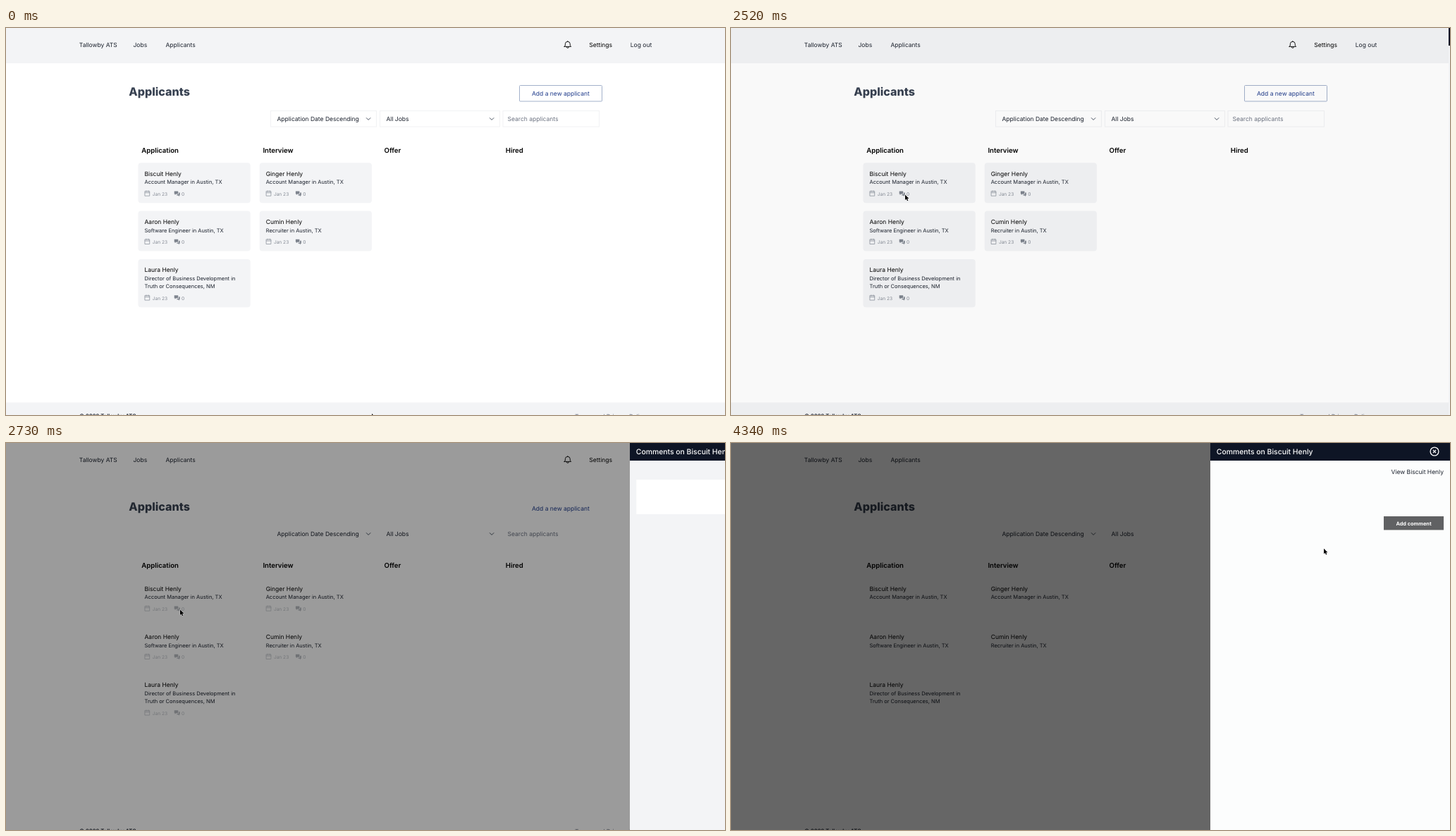
An HTML page that plays this animation: 1020 by 549 pixels, repeating every 4410 ms.

```html
<!DOCTYPE html>
<html lang="en">
<head>
<meta charset="utf-8">
<title>Applicants board</title>
<style>
  html, body { margin: 0; width: 100%; height: 100%; overflow: hidden; background: #fff; }
  svg { display: block; width: 1020px; height: 549px; }
  text { font-family: Inter, sans-serif; font-size: 8.5px; fill: #1a202c; text-rendering: geometricPrecision; }
  .surface { fill: #f3f4f6; }
  .field { fill: none; stroke: #f1f2f4; }
  .button { fill: #fff; stroke: #a3b1cb; }
  .line { fill: none; stroke: #374151; stroke-width: .9; stroke-linecap: round; stroke-linejoin: round; }
  .strong { fill: #000; }
  .action { fill: #1e3a8a; }
  .muted { fill: #6b7280; }
  .title { font-size: 16.1px; font-weight: 800; fill: #374151; }
  .column { font-size: 9.6px; font-weight: 600; fill: #000; }
  .role { font-size: 7.5px; }
  .copyright { font-size: 7.7px; font-weight: 600; }
  .meta text { font-size: 6.6px; fill: #858b95; }
  .meta .line { stroke: #858b95; stroke-width: .7; }
  .chat { fill: #7e848e; }
  .heading { font-size: 10.4px; font-weight: 500; fill: #fff; }
  .submit { font-size: 7.35px; font-weight: 700; fill: #fff; text-anchor: middle; }
  .end { text-anchor: end; }
  .flat .surface, .flat .field, .flat .button { visibility: hidden; }
  .flat .meta { opacity: .55; }
  .settled .meta, .settled #note { visibility: hidden; }
  #sheet { fill: #f3f4f6; }
  .settled #sheet { fill: #fcfdfd; }
  #arrow { stroke: #fff; stroke-width: .6; paint-order: stroke; }
</style>
</head>
<body>
<svg id="stage" viewBox="0 0 1020 549"></svg>
<script>
const LOOP = 4410, STEP = 70;
const stage = document.getElementById('stage');

const text = (x, y, str, cls = '') => `<text x="${x}" y="${y}" class="${cls}">${str}</text>`;
const rect = (x, y, w, h, cls, extra = '') =>
  `<rect x="${x}" y="${y}" width="${w}" height="${h}" class="${cls}" ${extra}/>`;

const field = (x, w, label, isSelect) =>
  rect(x, 117.5, w, 22.5, 'field') +
  text(x + (isSelect ? 9 : 6.6), 132, label, isSelect ? '' : 'muted') +
  (isSelect ? `<path class="line" d="M${x + w - 14.2} 127.6l2.8 2.8 2.8-2.8"/>` : '');

const board = {
  Application: [
    ['Biscuit Henly', 'Account Manager in Austin, TX'],
    ['Aaron Henly', 'Software Engineer in Austin, TX'],
    ['Laura Henly', 'Director of Business Development in', 'Truth or Consequences, NM'],
  ],
  Interview: [
    ['Ginger Henly', 'Account Manager in Austin, TX'],
    ['Cumin Henly', 'Recruiter in Austin, TX'],
  ],
  Offer: [],
  Hired: [],
};
const CARD_WIDTH = 159.2, LINE = 11.3;
const cardBoxes = [];

const meta = (x, y) => `<g class="meta" transform="translate(${x} ${y})">
  <path class="line" d="M.6-6.3h6.4v6.6h-6.4zM.6-4.2h6.4M2.3-7v1.4M5.3-7v1.4"/>
  ${text(11, 0, 'Jan 23')}
  <path class="chat" d="M42-6.5h5.5v4h-3l-1.5 1.5v-1.5h-1zM48.2-4.5h1.8v4h-1v1.5l-1.5-1.5h-2.3l1.2-1.3h1.8z"/>
  ${text(52.3, 0, '0')}</g>`;

function card(x, y, [name, ...role]) {
  const h = 45.7 + LINE * role.length;
  cardBoxes.push({ x, y, h });
  return rect(x, y, CARD_WIDTH, h, 'surface', 'rx="4"') +
    text(x + 9, y + 18.5, name, 'strong') +
    role.map((line, i) => text(x + 9, y + 30 + LINE * i, line, 'role')).join('') +
    meta(x + 9.2, y + h - 10.4);
}

function column([label, people], i) {
  const x = 187.5 + 172.2 * i;
  let y = 191.3;
  return text(x + 4.7, 177, label, 'column') + people.map(person => {
    const svg = card(x, y, person);
    y += 45.7 + LINE * person.length;
    return svg;
  }).join('');
}

stage.innerHTML = `
<g id="page">
  ${rect(0, 0, 1020, 50, 'surface')}
  ${text(103.8, 27.2, 'Tallowby ATS')}
  ${text(180.5, 27.2, 'Jobs')}
  ${text(226.5, 27.2, 'Applicants')}
  <path class="line" style="stroke:#000" d="M792 26.4h9.6l-1.3-1.6v-2a3.5 3.5 0 00-7 0v2zM795.2 26.6a1.6 1.8 0 003.2 0M796.8 18.5v.6"/>
  ${text(827.3, 27.2, 'Settings', 'strong')}
  ${text(885.8, 27.2, 'Log out')}
  ${text(174.3, 96, 'Applicants', 'title')}
  ${rect(728.5, 81.5, 117, 22.5, 'button', 'rx="1"')}
  ${text(746, 96.2, 'Add a new applicant', 'action')}
  ${field(375.5, 150, 'Application Date Descending', true)}
  ${field(530.5, 170, 'All Jobs', true)}
  ${field(705, 136.5, 'Search applicants', false)}
  ${Object.entries(board).map(column).join('')}
  ${rect(0, 531.3, 1020, 18, 'surface')}
  ${text(104, 553.3, '© 2022 Tallowby ATS', 'copyright')}
  ${text(807, 554, 'Terms and Privacy Policy', 'muted')}
</g>
<rect id="shade" width="1020" height="549"/>
<g id="panel">
  <rect id="sheet" width="340" height="549"/>
  <rect width="340" height="25" fill="#0e1525"/>
  ${text(8.8, 16.4, 'Comments on Biscuit Henly', 'heading')}
  <g fill="none" stroke="#fff" stroke-width="1.3">
    <circle cx="318" cy="12" r="5.9"/><path d="M316 10l4 4m0-4l-4 4"/>
  </g>
  ${text(331, 44, 'View Biscuit Henly', 'end')}
  <rect id="note" x="9.3" y="52" width="321.7" height="49" fill="#fff"/>
  <rect x="246" y="104" width="85" height="19.4" fill="#606163"/>
  ${text(288.5, 116.5, 'Add comment', 'submit')}
</g>
<path id="arrow" d="M0 0V7.6L1.8 6 3 8.8 4.3 8.2 3.1 5.5H5.4Z"/>
<g id="mover">${[0, 90, 180, 270].map(angle =>
  `<path transform="rotate(${angle})" d="M-.7 0V-2.6H-2L0-4.8 2-2.6H.7V0z"/>`).join('')}</g>`;

const [page, shade, panel, arrow, mover] =
  ['page', 'shade', 'panel', 'arrow', 'mover'].map(id => document.getElementById(id));

// Exponential ease in and out around a midpoint, from 0 to 1.
function swing(t, mid, halfLife) {
  const tail = .5 * 2 ** (-Math.abs(t - mid) / halfLife);
  return t < mid ? tail : 1 - tail;
}

const pointerStart = { x: 519, y: 547 };
const pointerMoves = [
  { from: 0, to: 140, x: 540, y: 479 },
  { from: 280, to: 560, x: 566, y: 438 },
  { from: 1050, to: 1330, x: 214, y: 283 },
  { from: 1400, to: 1470, x: 323.5, y: 295 },
  { from: 1470, to: 1750, x: 745, y: 98 },
  { from: 1750, to: 2100, x: 247, y: 236.5 },
  { from: 3360, to: 3920, x: 830, y: 160 },
  { from: 4060, to: 4340, x: 841, y: 149.7 },
];

function pointerAt(t) {
  let { x, y } = pointerStart;
  for (const move of pointerMoves) {
    const u = Math.min(1, Math.max(0, (t - move.from) / (move.to - move.from)));
    const k = u * u * (3 - 2 * u);
    x += (move.x - x) * k;
    y += (move.y - y) * k;
  }
  return { x, y };
}

function draw(now) {
  const t = Math.floor(now % LOOP / STEP) * STEP;
  const alpha = t < 2030 ? 0 : .6 * swing(t, 2703, 50);
  const shown = Math.round(340 * swing(t, 2742, 36));
  const { x, y } = pointerAt(t);

  page.classList.toggle('flat', alpha > .35);
  stage.classList.toggle('settled', t >= 3010);
  shade.setAttribute('opacity', alpha);
  panel.setAttribute('transform', `translate(${1020 - shown} 0)`);

  const overCard = t < 1960 && cardBoxes.some(box =>
    x > box.x && x < box.x + CARD_WIDTH && y > box.y && y < box.y + box.h);
  for (const [cursor, visible] of [[arrow, !overCard], [mover, overCard]]) {
    cursor.setAttribute('transform', `translate(${x} ${y})`);
    cursor.setAttribute('visibility', visible ? 'visible' : 'hidden');
  }
  requestAnimationFrame(() => draw(performance.now() - start));
}

const start = performance.now();
draw(0);
</script>
</body>
</html>
```
